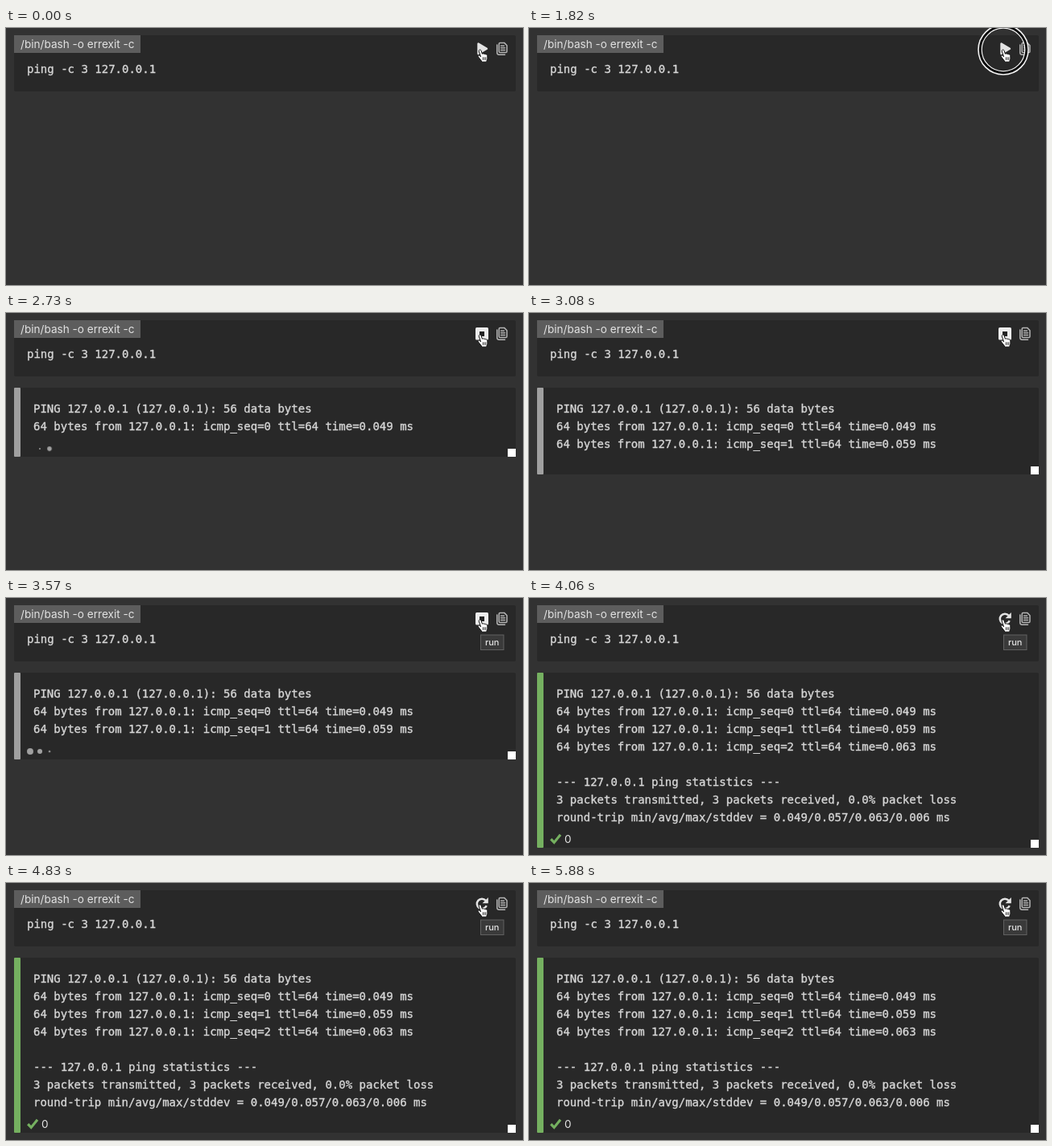
Write an HTML page that moves like this. It is 642 px wide and 320 px high and loops after 5950 ms.

```html
<!DOCTYPE html>
<html lang="en">
<head>
<meta charset="utf-8">
<title>Running a shell code block</title>
<style>
  html, body { margin: 0; width: 100%; height: 100%; overflow: hidden; background: #323232; }
  svg { display: block; width: 642px; height: 320px; }
  text { font: 14px "DejaVu Sans Mono", monospace; fill: #d6d6d6; stroke: #d6d6d6; stroke-width: .35px; }
  .ui { font-family: Inter, sans-serif; font-size: 13.6px; fill: #e2e2e2; stroke: none; }
  .tip { font-size: 11px; font-weight: 500; }
  .panel { fill: #282828; }
  .dot { fill: #a0a0a0; transform-box: fill-box; transform-origin: center; }
  .line { fill: none; stroke-linecap: round; stroke-linejoin: round; }
  .sharp { fill: none; stroke-linejoin: miter; }
</style>
</head>
<body>
<svg viewBox="0 0 642 320">
  <rect class="panel" x="10" y="9" width="623" height="70" rx="2"/>
  <rect x="10" y="9" width="157" height="22" fill="#5d5d5d"/>
  <text class="ui" x="18" y="25">/bin/bash -o errexit -c</text>
  <text x="26" y="56">ping -c 3 127.0.0.1</text>

  <!-- copy button -->
  <g class="line" stroke="#b4b4b4" stroke-width="1.5">
    <path d="M613.5 18.4h5.2l3.3 3.3v7.6q0 1.3-1.3 1.3h-7.2q-1.3 0-1.3-1.3v-9.6q0-1.3 1.3-1.3z"/>
    <path d="M609.8 21v9.8q0 2.4 2.4 2.4h7.3"/>
    <path d="M614.5 22.2h4M614.5 24.8h5M614.5 27.4h5"/>
  </g>

  <g id="output">
    <rect class="panel" id="box" x="10" y="93" width="623" rx="2"/>
    <rect id="bar" x="10" y="93" width="8" rx="1"/>
    <g id="lines"></g>
    <g id="footer">
      <rect x="623" y="-10" width="10" height="10" fill="#fff"/>
      <g id="loader">
        <circle class="dot" cx="30" cy="-10" r="4"/>
        <circle class="dot" cx="42" cy="-10" r="4"/>
        <circle class="dot" cx="54" cy="-10" r="4"/>
      </g>
      <g id="status">
        <path class="sharp" d="M27.2 -10.8l4 4.2 7.8-9.6" stroke="#75b060" stroke-width="3.2"/>
        <text class="ui" x="44" y="-6">0</text>
      </g>
    </g>
  </g>

  <path id="play" class="line" d="M586.5 19.5v12.5l10.5-6.2z" style="fill:#e4e4e4" stroke="#e4e4e4" stroke-width="2.4"/>
  <g id="stop">
    <rect x="583" y="18" width="16" height="15.5" rx="1.5" fill="#ececec"/>
    <rect x="588" y="23" width="6" height="6" fill="#222"/>
  </g>
  <g id="rerun">
    <path class="sharp" d="M595.7 21.8a6.2 6.2 0 1 0 1 6.5" stroke="#e4e4e4" stroke-width="2.5"/>
    <path d="M598.8 18v7.2h-7.2z" fill="#e4e4e4"/>
  </g>

  <g id="tooltip">
    <rect x="589.5" y="46" width="28.5" height="18.5" fill="#3a3a3a" stroke="#606060"/>
    <text class="ui tip" x="595" y="59">run</text>
  </g>

  <g id="ring" fill="none">
    <circle cx="589" cy="27" r="29" stroke="#f2f2f2" stroke-width="5.6"/>
    <circle cx="589" cy="27" r="28.8" stroke="#080808" stroke-width="2.8"/>
  </g>

  <!-- pointing hand -->
  <g class="line" stroke="#111" stroke-width="1">
    <path fill="#fff" d="M587.2 28.6c-.3-1.8 2.2-2.2 2.8-.4l1.4 4.2c.5-1.1 2-.9 2.3.2.6-.8 1.9-.5 2.1.5.9-.5 1.9 0 2 1.1l.1 3.1c0 1.7-.9 2.5-1.1 4.9h-5.9c-.5-1.8-1.8-2.9-2.9-4.3l-1.7-2.3c-.8-1.3 1-2.1 2-1l1 .9z"/>
    <path d="M592.2 36.7v2.8M594 36.7v2.8M595.8 36.7v2.8" stroke-width=".8"/>
  </g>
</svg>

<script>
const LOOP = 5950, TICK = 70;
const CLICK = 1820, START = 1960, FIRST = 2030, SECOND = 3010, HOVER = 3430, DONE = 4060;

const $ = id => document.getElementById(id);
const reply = (seq, ms) => `64 bytes from 127.0.0.1: icmp_seq=${seq} ttl=64 time=${ms} ms`;

// [time shown, text]
const log = [
  [FIRST, "PING 127.0.0.1 (127.0.0.1): 56 data bytes"],
  [FIRST, reply(0, "0.049")],
  [SECOND, reply(1, "0.059")],
  [DONE, reply(2, "0.063")],
  [DONE, ""],
  [DONE, "--- 127.0.0.1 ping statistics ---"],
  [DONE, "3 packets transmitted, 3 packets received, 0.0% packet loss"],
  [DONE, "round-trip min/avg/max/stddev = 0.049/0.057/0.063/0.006 ms"]
];

// element: [shown from, shown until]
const spans = {
  play: [0, START],
  ring: [CLICK, START],
  output: [START, LOOP],
  stop: [START, DONE],
  loader: [START, DONE],
  tooltip: [HOVER, LOOP],
  rerun: [DONE, LOOP],
  status: [DONE, LOOP]
};

const rows = log.map(([, content], i) => {
  const row = document.createElementNS("http://www.w3.org/2000/svg", "text");
  row.setAttribute("x", 34);
  row.setAttribute("y", 124 + 22 * i);
  row.textContent = content;
  return $("lines").appendChild(row);
});

const pulses = [...document.querySelectorAll(".dot")].map((dot, i) => {
  const pulse = dot.animate([
    { transform: "scale(0)", offset: 0, easing: "ease-in-out" },
    { transform: "scale(1)", offset: 0.4, easing: "ease-in-out" },
    { transform: "scale(0)", offset: 0.8 },
    { transform: "scale(0)", offset: 1 }
  ], { duration: 1400, iterations: Infinity });
  pulse.pause();
  return { pulse, lead: 320 - 160 * i };
});

const show = (el, on) => { el.style.display = on ? "" : "none"; };

function render(t) {
  for (const id in spans) show($(id), t >= spans[id][0] && t < spans[id][1]);
  rows.forEach((row, i) => show(row, t >= log[i][0]));

  const count = log.filter(([time]) => t >= time).length;
  const height = 42 + 22 * count;
  $("box").setAttribute("height", height);
  $("bar").setAttribute("height", height);
  $("bar").setAttribute("fill", t >= DONE ? "#75b060" : "#a0a0a0");
  $("footer").setAttribute("transform", `translate(0 ${93 + height})`);

  for (const { pulse, lead } of pulses) pulse.currentTime = Math.max(0, t - START) + lead;
}

const origin = performance.now();
function frame() {
  const t = (performance.now() - origin) % LOOP;
  render(Math.floor(t / TICK) * TICK);
  requestAnimationFrame(frame);
}
frame();
</script>
</body>
</html>
```
